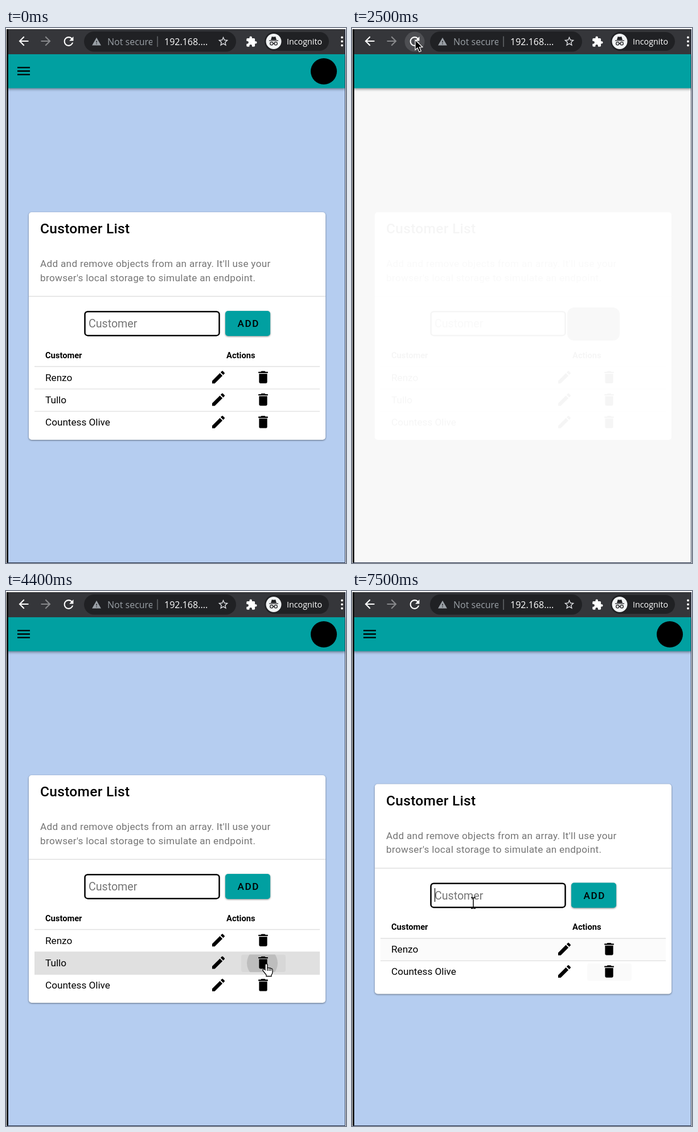
Write an HTML page that moves like this. It is 597x938 px and loops after 8000 ms.

```html
<!DOCTYPE html>
<html lang="en">
<head>
<meta charset="utf-8">
<title>Customer list</title>
<style>
  html, body { margin: 0; width: 100%; height: 100%; overflow: hidden; background: #fff; }
  svg { display: block; }
  text { font-family: Roboto, sans-serif; font-size: 17.15px; white-space: pre; }
  .chrome text { font-family: "Open Sans", sans-serif; font-size: 16px; fill: #fff; }
  .title { font-size: 24.5px; font-weight: 500; letter-spacing: .306px; }
  .note { letter-spacing: .306px; fill: #757575; }
  .head { font-size: 14.7px; font-weight: 700; }
  .hint { font-size: 19.6px; fill: #757575; }
  .label { font-weight: 500; letter-spacing: 1.53px; }
  .line { stroke: #e0e0e0; stroke-width: 1.3; }
  .teal { fill: #01a0a1; }
  .shadow { filter: drop-shadow(0 1.5px 1.5px #0007); }
</style>
</head>
<body>
<svg id="stage" width="597" height="938" viewBox="0 0 597 938"></svg>
<script>
const icons = {
  back: 'M20 11H7.83l5.59-5.59L12 4l-8 8 8 8 1.41-1.41L7.83 13H20z',
  reload: 'M17.65 6.35A7.96 7.96 0 0 0 12 4a8 8 0 1 0 7.73 10h-2.08A6 6 0 1 1 12 6c1.66 0 3.14.69 4.22 1.78L13 11h7V4z',
  warning: 'M1 21h22L12 2zm12-3h-2v-2h2zm0-4h-2v-4h2z',
  star: 'M22 9.24l-7.19-.62L12 2 9.19 8.63 2 9.24l5.46 4.73L5.82 21 12 17.27 18.18 21l-1.63-7.03zM12 15.4l-3.76 2.27 1-4.28-3.32-2.88 4.38-.38L12 6.1l1.71 4.04 4.38.38-3.32 2.88 1 4.28z',
  puzzle: 'M20.5 11H19V7c0-1.1-.9-2-2-2h-4V3.5a2.5 2.5 0 0 0-5 0V5H4c-1.1 0-2 .9-2 2v3.8h1.5a2.7 2.7 0 0 1 0 5.4H2V20c0 1.1.9 2 2 2h3.8v-1.5a2.7 2.7 0 0 1 5.4 0V22H17c1.1 0 2-.9 2-2v-4h1.5a2.5 2.5 0 0 0 0-5z',
  menu: 'M3 18h18v-2H3zm0-5h18v-2H3zm0-7v2h18V6z',
  edit: 'M3 17.25V21h3.75L17.81 9.94l-3.75-3.75zM20.71 7.04a1 1 0 0 0 0-1.41l-2.34-2.34a1 1 0 0 0-1.41 0l-1.83 1.83 3.75 3.75z',
  trash: 'M6 19c0 1.1.9 2 2 2h8c1.1 0 2-.9 2-2V7H6zM19 4h-3.5l-1-1h-5l-1 1H5v2h14z'
};
// Draws a 24-unit icon centred on (x, y).
const icon = (name, x, y, scale = 1.225, fill = '#000', attrs = '') =>
  `<path ${attrs} d="${icons[name]}" fill="${fill}" fill-rule="evenodd"
    transform="translate(${x} ${y}) scale(${scale}) translate(-12 -12)"/>`;
const rule = (y, x1 = 50, x2 = 551) => `<path class="line" d="M${x1} ${y}H${x2}"/>`;

const ROW_TOP = 593.5, ROW_HEIGHT = 39.3, SHIFT = 15.5;
const customers = ['Renzo', 'Tullo', 'Countess Olive'];

const row = name => `<g class="row">
  <rect class="hover" x="50" width="501" height="39.3" opacity="0"/>
  <svg x="413" y="4.5" width="78" height="31">
    <rect class="button" width="78" height="31" rx="4" opacity="0"/>
    <circle class="ripple" cx="37" cy="15" r="0" opacity=".12"/>
  </svg>
  ${rule(0)}
  <text x="69" y="25">${name}</text>
  ${icon('edit', 373, 18.7)}${icon('trash', 451.5, 18.7, 1.19)}
</g>`;

const chrome = `<g class="chrome">
  <path d="M1 2H595.5V46H1z" fill="#35363a"/>
  <circle id="reloadHover" cx="110" cy="24" r="17.5" fill="#4e4f53"/>
  ${icon('back', 31, 23, 1.06, '#fff')}
  <g transform="rotate(180 70 23)">${icon('back', 70, 23, 1.06, '#87888b')}</g>
  ${icon('reload', 110, 23.5, 1.05, '#fff')}
  <rect x="137" y="6" width="267" height="35.5" rx="17.7" fill="#202124"/>
  ${icon('warning', 159, 24, .72, '#9aa0a6')}
  <svg width="257" height="46"><text x="178" y="30" style="fill:#9aa0a6">Not secure</text></svg>
  <path d="M266 14.500V33" stroke="#6b6e72" stroke-width="1.4"/>
  <text x="278" y="30">192.168....</text>
  ${icon('star', 381.5, 23.5, .88, '#dadce0')}
  ${icon('puzzle', 431, 24, .87, '#fff')}
  <rect x="454" y="7" width="113" height="33" rx="16.500" fill="#202124"/>
  <circle cx="470" cy="23.500" r="13.500" fill="#f1f3f4"/>
  <path d="M465 21l1.800-6q3.200 1 6.400 0l1.800 6zM462 21.500h16v1.300h-16z" fill="#202124"/>
  <g fill="none" stroke="#202124" stroke-width="1.3">
    <circle cx="466.300" cy="27.300" r="2.600"/><circle cx="473.700" cy="27.300" r="2.600"/><path d="M469 27h2"/>
  </g>
  <text x="493" y="29" style="font-size:14.3px">Incognito</text>
  <g fill="#fff"><circle cx="590" cy="16.500" r="1.900"/><circle cx="590" cy="23.500" r="1.900"/><circle cx="590" cy="30.500" r="1.900"/></g>
</g>`;

const card = `<g id="card">
  <rect id="panel" class="shadow" x="40" y="323" width="521" rx="5" fill="#fff"/>
  <g id="content">
    <text class="title" x="60" y="360">Customer List</text>
    <text class="note" x="60" y="419">Add and remove objects from an array. It'll use your</text>
    <text class="note" x="60" y="443.500">browser's local storage to simulate an endpoint.</text>
    ${rule(470.5, 40, 561)}
    <rect x="138.500" y="497.200" width="236" height="42" rx="5" fill="#fff" stroke="#000" stroke-width="2.500"/>
    <text class="hint" x="145" y="525">Customer</text>
    <path id="caret" d="M145.500 505.500V529.500" stroke="#000" stroke-width="1.200"/>
    <g id="add">
      <rect class="teal shadow" x="385" y="496" width="79" height="44" rx="5"/>
      <text class="label" x="406.500" y="524">ADD</text>
    </g>
    <text class="head" x="69" y="578.500">Customer</text>
    <text class="head" x="387" y="578.500">Actions</text>
    ${customers.map(row).join('')}
  </g>
  <rect id="blank" x="378" y="490" width="92" height="58" rx="12" fill="#f8f8f8"/>
</g>`;

const pointers = `
<path id="arrow" d="M0 0V17.500L4 13.800 7 20.800 10.300 19.400 7.300 12.500H12.800z" fill="#000" stroke="#fff" stroke-width="1.200"/>
<path id="hand" d="M-2 1.500Q-2-.5 0-.5T2 1.500V7.500Q3 6 5 7.300 6.500 6.500 8 8 11 7.500 11 10.500V14Q11 17 9 19V21.500H0V19L-6 11.500Q-6.500 8.500-3.500 9L-2 10.500zM2 8V12M5 8.500V12M8 9V12" fill="#fff" stroke="#000" stroke-width="1.300"/>
<path id="beam" d="M-4-9.500H-1.500L0-8.500 1.500-9.500H4M0-8.500V8.500M-4 9.500H-1.500L0 8.500 1.500 9.500H4" fill="none" stroke="#000" stroke-width="1.500"/>`;

const stage = document.getElementById('stage');
stage.innerHTML = `
  <rect id="page" x="1" y="46" width="594.500" height="892"/>
  ${card}
  <rect class="teal" x="3" y="46" width="592.500" height="59.500" style="filter:drop-shadow(0 2px 2px #0006)"/>
  ${icon('menu', 31, 75.5, 1.225, '#000', 'id="menu"')}
  <circle id="badge" cx="558" cy="76" r="23"/>
  ${chrome}
  <path d="M1 2H4V938H1z"/>
  <path d="M595.500 2V937.500H1" fill="none" stroke="#26314a"/>
  <g id="pointer">${pointers}</g>`;

const $ = id => document.getElementById(id);
const show = (id, on) => $(id).setAttribute('visibility', on ? 'visible' : 'hidden');
const move = (el, x, y) => el.setAttribute('transform', `translate(${x} ${y})`);
const rows = [...stage.querySelectorAll('.row')];

// Pointer route: time, x, y
const route = [
  [300, 575, 30], [400, 302, 53], [500, 302, 53], [1300, 126, 145], [1400, 126, 145],
  [1500, 112, 102], [2100, 111, 21], [2600, 111, 21], [3100, 291, 417], [3200, 291, 417],
  [3400, 345, 487], [3800, 450, 676], [4100, 457, 654], [4900, 457, 654], [5200, 457, 525],
  [5800, 128, 54], [6100, 111, 21], [6400, 111, 21], [7200, 213, 547], [8000, 213, 547]
];

function pointerAt(t) {
  const i = Math.max(1, route.findIndex(key => key[0] >= t));
  const [t0, x0, y0] = route[i - 1], [t1, x1, y1] = route[i];
  const k = Math.max(0, (t - t0) / (t1 - t0));
  return [x0 + (x1 - x0) * k, y0 + (y1 - y0) * k];
}

function render(time) {
  const t = Math.floor(time / 100) * 100 % 8000;
  const loading = t === 2500, removed = t >= 4500;
  const shift = removed ? SHIFT : 0;
  const [x, y] = pointerAt(t), cardY = y - shift;
  const within = (left, top, right, bottom) =>
    x >= left && x <= right && cardY >= top && cardY <= bottom;

  $('page').setAttribute('fill', loading ? '#f8f8f8' : '#b5cdf0');
  move($('card'), 0, shift);
  $('panel').setAttribute('height', removed ? 368 : 399);
  $('panel').style.filter = loading ? 'none' : '';
  $('content').setAttribute('opacity', loading ? .035 : 1);
  show('blank', loading);
  show('add', !loading);
  show('menu', !loading);
  show('badge', t < 2500 || t >= 2700);
  show('caret', t >= 2600 && t < 3100 || t >= 3600 && t < 4100 || t >= 7500);
  show('reloadHover', Math.hypot(x - 110, y - 24) < 17.5);

  let overTrash = false;
  rows.forEach((el, i) => {
    const top = ROW_TOP + ROW_HEIGHT * (removed && i === 2 ? 1 : i);
    const visible = !(removed && i === 1);
    const hovered = visible && within(50, top, 551, top + ROW_HEIGHT - .1);
    const onTrash = hovered && x >= 413 && x <= 491;
    overTrash ||= onTrash;
    el.style.display = visible ? '' : 'none';
    move(el, 0, top);
    const set = (part, name, value) => el.querySelector(part).setAttribute(name, value);
    set('.hover', 'opacity', hovered ? .12 : removed && i === 0 ? .015 : 0);
    set('.button', 'opacity', onTrash ? .04 : removed && i === 2 ? .02 : 0);
    set('.ripple', 'r', i === 1 && t === 4400 ? 27 : 0);
  });

  const beam = within(138, 497, 375, 540) || within(60, 404, 465, 449);
  const hand = overTrash || within(385, 496, 464, 540);
  show('beam', t >= 300 && beam);
  show('hand', t >= 300 && hand);
  show('arrow', t >= 300 && !beam && !hand);
  move($('pointer'), x, y);
}

const start = performance.now();
(function tick() {
  render(performance.now() - start);
  requestAnimationFrame(tick);
})();
</script>
</body>
</html>
```
